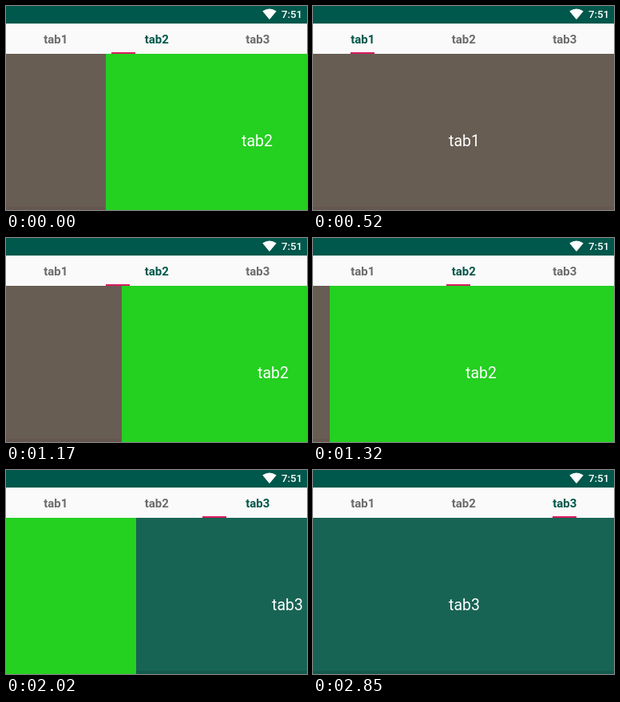
An HTML page with a canvas that plays this animation: 377 by 256 pixels, repeating every 3100 ms.

```html
<!DOCTYPE html>
<html lang="en">
<head>
<meta charset="utf-8">
<title>Swipeable tabs</title>
<style>
  html, body { margin: 0; width: 100%; height: 100%; overflow: hidden; }
  canvas { display: block; }
</style>
</head>
<body>
<canvas id="stage" width="377" height="256"></canvas>
<script>
const W = 377, H = 256, LOOP = 3100, BAR_TOP = 22, PAGE_TOP = 60;
const TAB_X = 62.3, TAB_STEP = 126.5, MARK_W = 30;
const ctx = document.getElementById('stage').getContext('2d', { alpha: false });

const pages = [
  { label: 'tab1', color: '#685d53', edge: '#665650' },
  { label: 'tab2', color: '#24d020', edge: '#24d020' },
  { label: 'tab3', color: '#186454', edge: '#145a4c' }
];

// Time in ms and pager scroll in px; each position holds until the next.
const steps = [
  [0, 252], [130, 24], [250, 2], [400, 1], [520, 0],
  [1050, 97], [1170, 232], [1320, 356], [1480, 374], [1620, 377],
  [2020, 591], [2150, 740], [2270, 750], [2430, 754]
];

function rect(color, x, y, w, h) {
  ctx.fillStyle = color;
  ctx.fillRect(x, y, w, h);
}

function text(str, x, y, font, color) {
  ctx.font = font + ' Roboto, sans-serif';
  ctx.fillStyle = color;
  ctx.fillText(str, x, y);
}

function drawPages(scroll) {
  pages.forEach((page, i) => {
    const x = i * W - scroll;
    if (Math.abs(x) >= W) return;
    rect(page.color, x, PAGE_TOP, W, H - PAGE_TOP);
    rect(page.edge, x, H - 4, W, 4);
    text(page.label, x + 189.5, 176, '19.5px', '#fff');
  });
}

function drawTabs(position) {
  rect('#fafafa', 0, BAR_TOP, W, PAGE_TOP - BAR_TOP);
  const selected = Math.round(position);
  pages.forEach((page, i) => {
    const color = i === selected ? '#00574b' : '#6b6b6b';
    text(page.label, TAB_X + i * TAB_STEP, 46.5, 'bold 15px', color);
  });
  const x = Math.round(TAB_X - MARK_W / 2 + position * TAB_STEP);
  rect('#d81b60', x, PAGE_TOP - 2, MARK_W, 2);
}

function drawStatus() {
  rect('#00574b', 0, 0, W, BAR_TOP);
  ctx.fillStyle = '#fff';
  ctx.beginPath();
  ctx.moveTo(321.3, 6.5);
  ctx.quadraticCurveTo(330, 0.3, 338.7, 6.5);
  ctx.lineTo(330, 17);
  ctx.fill();
  text('7:51', 358, 15.3, '500 13.3px', '#fff');
}

function draw(now) {
  const time = now % LOOP;
  const scroll = steps.findLast(([start]) => start <= time)[1];
  ctx.textAlign = 'center';
  drawPages(scroll);
  drawTabs(scroll / W);
  drawStatus();
}

const began = performance.now();
function tick() {
  draw(performance.now() - began);
  requestAnimationFrame(tick);
}
tick();
</script>
</body>
</html>
```
